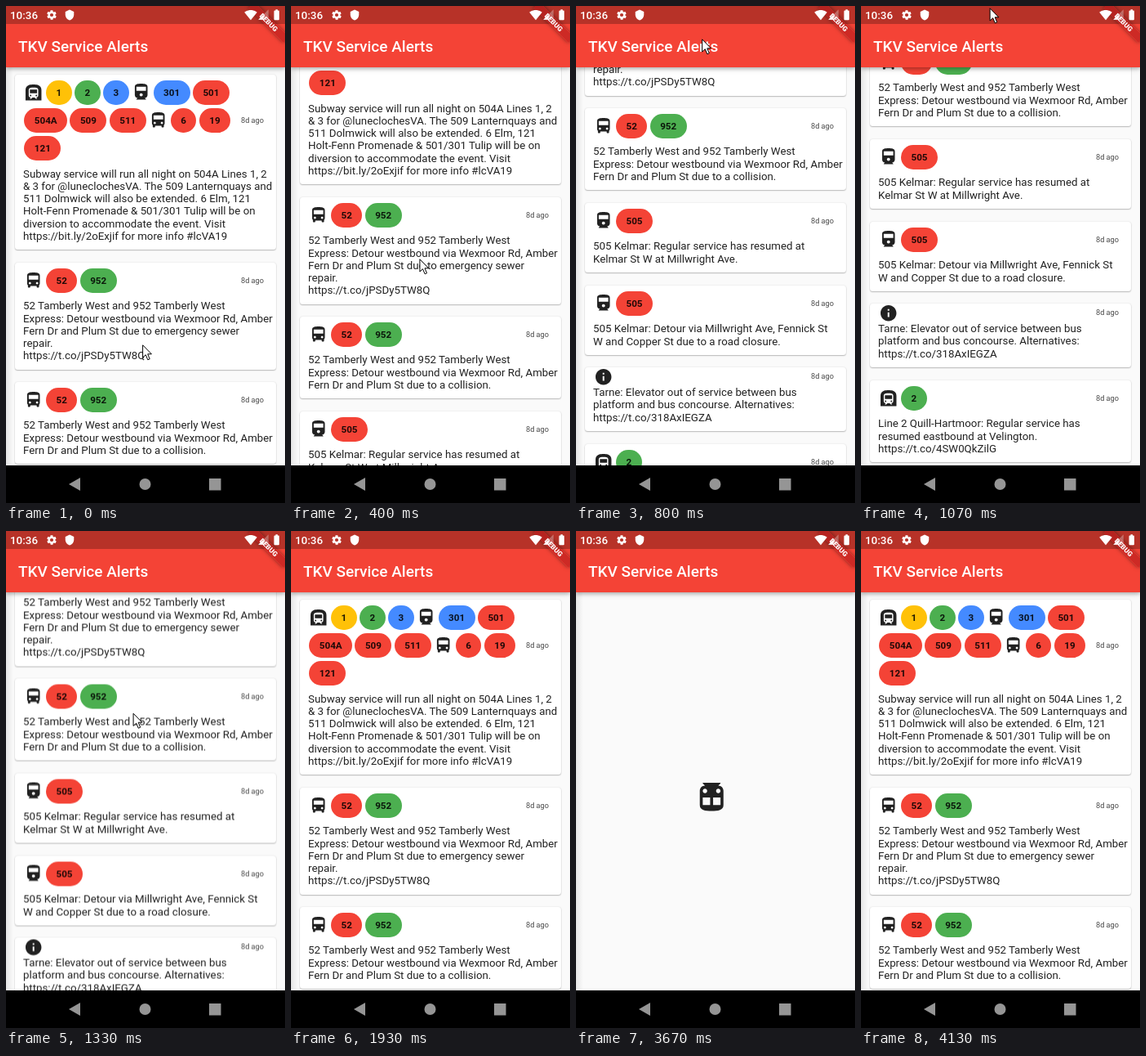
Animation of 342 by 608 pixels, one loop 5140 ms. Source, as an HTML page:

```html
<!DOCTYPE html>
<html lang="en">
<head>
<meta charset="utf-8">
<title>Service Alerts</title>
<style>
html, body { margin: 0; width: 100%; height: 100%; overflow: hidden; background: #000; }
#stage { position: relative; width: 342px; height: 608px; overflow: hidden; background: #fafafa;
  font-family: Roboto, "Noto Sans", sans-serif; color: rgba(0,0,0,.87); }
#stage div, #stage svg { position: absolute; }
svg { display: block; overflow: visible; }
#body { left: 0; top: 75px; width: 342px; height: 487px; overflow: hidden; }
#list { left: 0; top: -75px; width: 342px; will-change: transform; }
#edge { left: 0; top: 0; width: 9px; height: 487px; background: linear-gradient(90deg, rgba(0,0,0,.08), transparent); }
#bar { left: 0; top: 22px; width: 342px; height: 53px; background: #f44336;
  box-shadow: 0 2px 4px rgba(0,0,0,.2), 0 3px 6px rgba(0,0,0,.12); }
#title { left: 15px; top: 16px; font: 500 19px/24px Roboto, sans-serif; color: #fff; white-space: pre; }
#status { left: 0; top: 0; width: 342px; height: 22px; background: #b73228; }
#clock { left: 5px; top: 3px; font: 500 13.4px/17px Roboto, sans-serif; color: #fff; }
#corner { left: 0; top: 0; width: 342px; height: 75px; overflow: hidden; }
#ribbon { left: 292px; top: 15px; width: 60px; height: 10px; padding: 0; transform: rotate(45deg);
  transform-origin: 50% 50%; background: rgba(183,28,28,.63); box-shadow: 0 0 5px rgba(0,0,0,.5);
  font: 900 8.5px/10px Roboto, sans-serif; color: #fff; text-align: center; }
#nav { left: 0; top: 562px; width: 342px; height: 46px; background: #000; }
.card { left: 11px; width: 320px; background: #fff; border-radius: 3.3px;
  box-shadow: 0 1px 1.5px rgba(0,0,0,.24), 0 0 2px rgba(0,0,0,.14); }
#stage .row { left: 11.3px; height: 30px; display: flex; gap: 3.3px; align-items: center; }
#stage .row > * { position: static; flex: none; }
.chip { height: 30px; padding: 0 12.5px; border-radius: 15px; font: 700 11.64px/30px Roboto, sans-serif; }
.text { left: 10px; font-size: 13.3px; line-height: 15.2px; white-space: pre; }
.age { right: 15px; font-size: 9.2px; line-height: 12px; color: rgba(0,0,0,.72); white-space: pre; }
</style>
</head>
<body>
<div id="stage">
  <div id="body">
    <div id="list"></div>
    <div id="loader"></div>
    <div id="edge"></div>
  </div>
  <div id="bar"><div id="title">TKV Service Alerts</div></div>
  <div id="status"></div>
  <div id="corner"><div id="ribbon">DEBUG</div></div>
  <div id="icons"><div id="clock">10:36</div></div>
  <div id="nav">
    <svg width="342" height="46" fill="#959595">
      <path d="M77 23L91 15V31Z"/><circle cx="170.5" cy="23" r="7"/><rect x="249" y="16" width="14.5" height="14.5"/>
    </svg>
  </div>
  <svg id="cursor" width="12" height="20" style="left:0;top:0">
    <path d="M.6 .8V16L4.2 12.7L6.8 18.8L9.2 17.8L6.7 11.8H11.4Z" fill="#fff" stroke="#000" stroke-width="1"/>
  </svg>
</div>
<script>
const $ = id => document.getElementById(id);

const wheels = "M7.5 17c-.83 0-1.5-.67-1.5-1.5S6.67 14 7.5 14s1.5.67 1.5 1.5S8.33 17 7.5 17z" +
  "M16.5 17c-.83 0-1.5-.67-1.5-1.5s.67-1.5 1.5-1.5 1.5.67 1.5 1.5-.67 1.5-1.5 1.5z";
const paths = {
  subway: "M17.8 2.8C16 2.09 13.86 2 12 2s-4 .09-5.8.8C3.53 3.84 2 6.05 2 8.86V22h20V8.86c0-2.81-1.53-5.02-4.2-6.06z" +
    "M18 15.88c0 1.45-1.18 2.62-2.63 2.62l1.13 1.12V20H15l-1.5-1.5h-2.83L9.17 20H7.5v-.38l1.12-1.12C7.18 18.5 6 17.32 6 15.88V9c0-2.63 3-3 6-3 3.32 0 6 .38 6 3z" +
    "M7.5 8.5h9V13h-9zM9.4 16a1 1 0 1 1-2 0a1 1 0 1 1 2 0zM16.6 16a1 1 0 1 1-2 0a1 1 0 1 1 2 0z",
  rail: "M4 15.5C4 17.43 5.57 19 7.5 19L6 20.5v.5h12v-.5L16.5 19c1.93 0 3.5-1.57 3.5-3.5V5c0-3.5-3.58-4-8-4s-8 .5-8 4z" +
    "M12 17c-1.1 0-2-.9-2-2s.9-2 2-2 2 .9 2 2-.9 2-2 2zM18 10H6V5h12z",
  bus: "M4 16c0 .88.39 1.67 1 2.22V20c0 .55.45 1 1 1h1c.55 0 1-.45 1-1v-1h8v1c0 .55.45 1 1 1h1c.55 0 1-.45 1-1v-1.78c.61-.55 1-1.34 1-2.22V6c0-3.5-3.58-4-8-4s-8 .5-8 4z" +
    wheels + "M18 11H6V6h12z",
  train: "M12 2c-4.42 0-8 .5-8 4v9.5C4 17.43 5.57 19 7.5 19L6 20.5v.5h12v-.5L16.5 19c1.93 0 3.5-1.57 3.5-3.5V6c0-3.5-3.58-4-8-4z" +
    wheels + "M11 11H6V6h5zM18 11h-5V6h5z",
  info: "M12 2C6.48 2 2 6.48 2 12s4.48 10 10 10 10-4.48 10-10S17.52 2 12 2zM13 17h-2v-6h2zM13 9h-2V7h2z",
  gear: "M19.4 13c.1-.3.1-.6.1-1s0-.7-.1-1l2.1-1.6c.2-.2.2-.4.1-.6l-2-3.5c-.1-.2-.4-.3-.6-.2l-2.5 1c-.5-.4-1.1-.7-1.7-1l-.4-2.6c0-.3-.2-.5-.5-.5h-4c-.2 0-.4.2-.5.4l-.4 2.7c-.6.2-1.2.6-1.7 1l-2.5-1c-.2-.1-.5 0-.6.2l-2 3.5c-.1.2-.1.5.1.6L4.6 11c-.1.3-.1.7-.1 1s0 .7.1 1l-2.1 1.6c-.2.2-.2.4-.1.6l2 3.5c.1.2.4.3.6.2l2.5-1c.5.4 1.1.7 1.7 1l.4 2.6c0 .3.2.5.5.5h4c.2 0 .4-.2.5-.4l.4-2.7c.6-.2 1.2-.6 1.7-1l2.5 1c.2.1.5 0 .6-.2l2-3.5c.1-.2.1-.5-.1-.6z" +
    "M12 15.6A3.6 3.6 0 1 1 12 8.4A3.6 3.6 0 1 1 12 15.6z",
  shield: "M12 1L3 5v6c0 5.55 3.84 10.74 9 12 5.16-1.26 9-6.45 9-12V5z",
  wifi: "M12 21.5L23.64 7C23.19 6.66 18.71 3 12 3S.81 6.66.36 7z",
  signal: "M2 22h20V2z",
  bars: "M2 22h10V12z",
  battery: "M15.67 4H14V2h-4v2H8.33C7.6 4 7 4.6 7 5.33v15.33C7 21.4 7.6 22 8.33 22h7.33c.74 0 1.34-.6 1.34-1.33V5.33C17 4.6 16.4 4 15.67 4z"
};
const icon = (name, size, style = "", fill = "#212121") =>
  `<svg width="${size}" height="${size}" viewBox="0 0 24 24" fill="${fill}" style="${style}">` +
  `<path fill-rule="evenodd" d="${paths[name]}"/></svg>`;

const red = "#f44336", green = "#4caf50", blue = "#448aff";
const tints = { 1: "#ffc107", 2: green, 3: blue, 301: blue, 952: green };

// top, height, rows of icons and chips, text
const cards = [
  [84, 214, "subway 1 2 3 rail 301 501|504A 509 511 bus 6 19|121",
    "Subway service will run all night on 504A Lines 1, 2\n& 3 for @luneclochesVA. The 509 Lanternquays and\n511 Dolmwick will also be extended. 6 Elm, 121\nHolt-Fenn Promenade & 501/301 Tulip will be on\ndiversion to accommodate the event. Visit\nhttps://bit.ly/2oExjif for more info #lcVA19"],
  [314, 130.5, "bus 52 952",
    "52 Tamberly West and 952 Tamberly West\nExpress: Detour westbound via Wexmoor Rd, Amber\nFern Dr and Plum St due to emergency sewer\nrepair.\nhttps://t.co/jPSDy5TW8Q"],
  [460, 100, "bus 52 952",
    "52 Tamberly West and 952 Tamberly West\nExpress: Detour westbound via Wexmoor Rd, Amber\nFern Dr and Plum St due to a collision."],
  [576, 85, "rail 505",
    "505 Kelmar: Regular service has resumed at\nKelmar St W at Millwright Ave."],
  [677, 85, "rail 505",
    "505 Kelmar: Detour via Millwright Ave, Fennick St\nW and Copper St due to a road closure."],
  [777, 78, "info",
    "Tarne: Elevator out of service between bus\nplatform and bus concourse. Alternatives:\nhttps://t.co/318AxIEGZA"],
  [871, 100, "subway 2",
    "Line 2 Quill-Hartmoor: Regular service has\nresumed eastbound at Velington.\nhttps://t.co/4SW0QkZilG"]
];

const badge = word => paths[word] ? icon(word, 23.4)
  : `<div class="chip" style="background:${tints[word] || red}">${word}</div>`;

$("list").innerHTML = cards.map(([top, height, badges, text]) => {
  const rows = badges.split("|");
  const mid = badges === "info" ? 11.3 : 22;
  const last = (rows.length - 1) * 34.2;
  const first = badges === "info" ? 30.7 : 53 + last;
  return `<div class="card" style="top:${top}px;height:${height}px">` +
    rows.map((row, i) => `<div class="row" style="top:${mid - 15 + i * 34.2}px">` +
      row.split(" ").map(badge).join("") + "</div>").join("") +
    `<div class="age" style="top:${mid + last / 2 - 6}px">8d ago</div>` +
    `<div class="text" style="top:${first - 7.6}px">${text.replace(/&/g, "&amp;")}</div></div>`;
}).join("");

const place = (name, x, y, size, more = "") =>
  icon(name, size, `left:${x}px;top:${y}px;${more}`, "#fff");
$("icons").innerHTML += place("gear", 49, 4, 14) + place("shield", 70.5, 4, 14) +
  place("wifi", 292, 3, 16) + place("signal", 308, 3, 15, "opacity:.3") +
  place("bars", 308, 3, 15) + place("battery", 323.5, 3, 15.5);

$("loader").innerHTML = icon("train", 43.5, "left:149.2px;top:222.3px");
$("loader").style.transformOrigin = "168.5px 246.5px";

const LOOP = 5140, TICK = 200 / 3;
const scrollKeys = [[200, 0], [267, 10], [333, 40], [400, 80], [467, 115], [533, 145], [600, 174.5],
  [667, 225], [733, 275], [800, 335], [867, 385], [933, 413], [1133, 413], [1200, 392],
  [1267, 342], [1333, 280], [1400, 190], [1467, 85], [1533, 0]];
const yKeys = [[67, 414], [200, 405], [267, 380], [333, 350], [467, 268], [600, 191], [667, 140],
  [733, 90], [800, 40], [867, 12], [933, 3], [1067, 2], [1133, 20], [1200, 75], [1333, 222],
  [1533, 470], [1600, 476]];
const xKeys = [[67, 167], [600, 151.5], [1067, 157.5], [1333, 155.5], [1533, 150], [1600, 80]];

function at(keys, t) {
  if (t <= keys[0][0]) return keys[0][1];
  for (let i = 1; i < keys.length; i++) {
    const [t0, a] = keys[i - 1], [t1, b] = keys[i];
    if (t <= t1) return a + (b - a) * (t - t0) / (t1 - t0);
  }
  return keys[keys.length - 1][1];
}

function draw(now) {
  const tick = Math.floor((now % LOOP + 4) / TICK);
  const t = tick * TICK;
  const loading = tick >= 46 && tick < 62;
  $("list").style.transform = `translateY(${-at(scrollKeys, t)}px)`;
  $("list").style.display = loading ? "none" : "block";
  $("loader").style.display = loading ? "block" : "none";
  $("loader").style.transform = `rotate(${(Math.min(tick, 60) - 46) * 20}deg)`;
  $("cursor").style.display = tick < 25 ? "block" : "none";
  $("cursor").style.transform = `translate(${at(xKeys, t)}px, ${at(yKeys, t)}px)`;
}

const start = performance.now();
function loop() {
  draw(performance.now() - start);
  requestAnimationFrame(loop);
}
loop();
</script>
</body>
</html>
```
